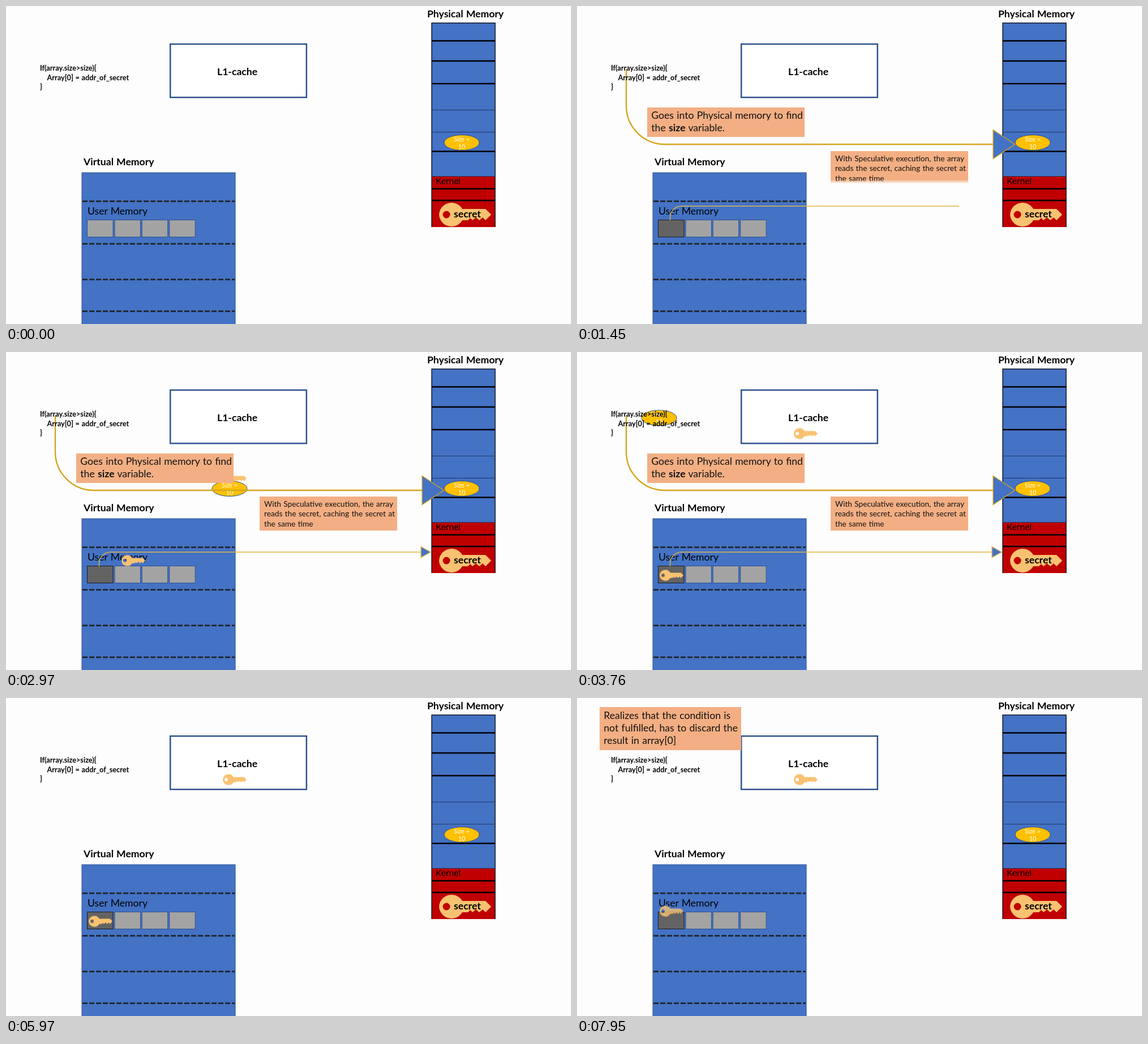
Animation of 998x561 px, one loop 7.99 s. Source, as an HTML page:

```html
<!DOCTYPE html>
<html lang="en">
<head>
<meta charset="utf-8">
<title>Speculative read</title>
<style>
@property --shown { syntax: "<percentage>"; inherits: false; initial-value: 0%; }
:root {
  --loop: 7990ms linear infinite;
  --quad-in: cubic-bezier(.333, 0, .667, .333);
  --quad-out: cubic-bezier(.333, .667, .667, 1);
}
html, body { margin: 0; width: 100%; height: 100%; overflow: hidden; background: #fdfdfd; }
body, text { font-family: Lato, "Open Sans", sans-serif; font-size: 17.6px; word-spacing: .045em; }
svg { position: absolute; left: 0; top: 0; }
.bold { font-weight: 700; }
.code { font-size: 12.7px; font-weight: 700; white-space: pre; }
.size text { font-size: 10.7px; fill: #fff; text-anchor: middle; }
.size ellipse { fill: #ffc000; stroke: #2f528f; }
.cells rect { fill: #a3a3a3; stroke: #2f528f; }
.arrow { fill: none; stroke: #d3a51d; stroke-width: 2.4; }
.arrow polygon { fill: #4472c4; stroke-width: 1.4; }
.arrow.thin { stroke: #dfb545; stroke-width: 1.4; }

/* Captions slide vertically while a soft edge wipes them */
.note {
  position: absolute; box-sizing: border-box; padding: 3.6px 0 0 7.3px;
  background: #f3af83; color: #111; line-height: 22.3px; white-space: nowrap;
  -webkit-mask-image: linear-gradient(#000 calc(var(--shown) - 12%), transparent var(--shown));
  mask-image: linear-gradient(#000 calc(var(--shown) - 12%), transparent var(--shown));
}
#find { left: 124px; top: 178.5px; width: 278px; height: 52.5px; animation: findWipe var(--loop), findSlide var(--loop); }
#spec { left: 448px; top: 255px; width: 242.5px; height: 60px; font-size: 13.7px; line-height: 17.5px; padding-left: 8px;
  animation: specWipe var(--loop), specSlide var(--loop); }
#drop { left: 40px; top: 16px; width: 249.5px; height: 75.5px; animation: dropWipe var(--loop), dropSlide var(--loop); }

@keyframes findWipe { 0%, .25% { --shown: 0%; } 6.51%, 57.07% { --shown: 112%; } 63.45%, 100% { --shown: 0%; } }
@keyframes specWipe { 0%, 12.77% { --shown: 0%; } 19.02%, 57.07% { --shown: 112%; } 63.45%, 100% { --shown: 0%; } }
@keyframes dropWipe { 0%, 86.6% { --shown: 0%; } 92.87%, 100% { --shown: 112%; } }
@keyframes findSlide {
  0%, .25% { translate: 0 56px; animation-timing-function: var(--quad-out); }
  6.51% { translate: 0 0; }
  57.07% { translate: 0 0; animation-timing-function: var(--quad-out); }
  63.45%, 100% { translate: 0 56px; }
}
@keyframes specSlide {
  0%, 12.77% { translate: 0 56px; animation-timing-function: var(--quad-out); }
  19.02% { translate: 0 0; }
  57.07% { translate: 0 0; animation-timing-function: var(--quad-out); }
  63.45%, 100% { translate: 0 56px; }
}
@keyframes dropSlide {
  0%, 86.6% { translate: 0 56px; animation-timing-function: var(--quad-out); }
  92.87%, 100% { translate: 0 0; }
}

/* Arrows wipe in from the left and fade out together */
#toSize { animation: sizeWipe var(--loop), arrowFade var(--loop); }
#toSecret { animation: secretWipe var(--loop), arrowFade var(--loop); }
@keyframes sizeWipe { 0%, .25% { clip-path: inset(-5px 101% -5px -5px); } 6.51%, 100% { clip-path: inset(-5px -5px -5px -5px); } }
@keyframes secretWipe { 0%, 12.77% { clip-path: inset(-5px 101% -5px -5px); } 19.02%, 100% { clip-path: inset(-5px -5px -5px -5px); } }
@keyframes arrowFade { 0%, 57.07% { opacity: 1; } 63.45%, 100% { opacity: 0; } }

#target { animation: darken var(--loop); }
@keyframes darken { 0%, 6.51% { fill: #a3a3a3; stroke: #2f528f; } 12.77%, 100% { fill: #636363; stroke: #1c1c1c; } }

/* Travelling parts */
.mover { offset-rotate: 0deg; }
#sizeCopy { offset-path: path("M805 241H145V86"); animation: sizeTravel var(--loop), sizeSeen var(--loop); }
#keyToCell { offset-path: path("M811 368H167V394"); }
#keyToCache { offset-path: path("M811 368H404V144"); }
#keyToCell, #keyToCache { animation: keyTravel var(--loop), keySeen var(--loop); }
#discard { animation: rise var(--loop); }
@keyframes keyTravel {
  0%, 19.02% { offset-distance: 0%; animation-timing-function: var(--quad-in); }
  31.54% { offset-distance: 50%; animation-timing-function: var(--quad-out); }
  44.06%, 100% { offset-distance: 100%; }
}
@keyframes keySeen { 0%, 19.02% { opacity: 0; } 19.03%, 100% { opacity: 1; } }
@keyframes sizeTravel {
  0%, 21.9% { offset-distance: 0%; animation-timing-function: var(--quad-in); }
  36.98% { offset-distance: 50%; animation-timing-function: var(--quad-out); }
  52.07%, 100% { offset-distance: 100%; }
}
@keyframes sizeSeen { 0%, 21.9% { opacity: 0; } 21.91%, 74.28% { opacity: 1; } 74.29%, 100% { opacity: 0; } }
@keyframes rise {
  0%, 92.87% { translate: 0 0; opacity: 1; animation-timing-function: var(--quad-in); }
  100% { translate: 0 -18px; opacity: .8; }
}
</style>
</head>
<body>
<svg width="998" height="561" viewBox="0 0 998 561">
  <defs>
    <path id="key" fill="#f9c271" fill-rule="evenodd" d="M-46 0A22 22 0 0 1 -5 -10H36L46 0L36 10L31 5L25 10L19 5L13 10L9 6L5 10H-5A22 22 0 0 1 -46 0ZM-39.5 0A6.5 6.5 0 0 0 -26.5 0A6.5 6.5 0 0 0 -39.5 0Z"/>
    <g id="size" class="size">
      <ellipse rx="31" ry="13.5"/>
      <text y="-2.5">Size =</text>
      <text y="11">10</text>
    </g>
  </defs>

  <rect x="290.2" y="67.2" width="240.6" height="94" fill="#fff" stroke="#2f528f" stroke-width="2.5"/>
  <text class="bold" x="373" y="122">L1-cache</text>

  <text class="bold" x="744" y="19.5">Physical Memory</text>
  <rect x="752" y="30" width="112" height="271" fill="#4472c4"/>
  <rect x="752" y="300" width="112" height="90" fill="#c00000"/>
  <path d="M752 390V30H864V390" fill="none" stroke="#0d1526" stroke-width="1.5"/>
  <path d="M752 61.5H864M752 97H864M752 137H864M752 256.5H864M752 322.5H864M752 343H864" stroke="#000" stroke-width="2.6"/>
  <path d="M752 183.5H864M752 222.5H864M752 300.5H864" stroke="#1f3864"/>
  <use href="#size" x="805" y="241"/>
  <text x="759" y="314" style="font-size:15.5px">Kernel</text>
  <use href="#key" x="811" y="368"/>
  <text class="bold" x="791" y="373">secret</text>

  <text class="bold" x="137" y="280.5">Virtual Memory</text>
  <rect x="134" y="294" width="271" height="280" fill="#4472c4" stroke="#2f528f"/>
  <path d="M135 344.5H404M135 419.5H404M135 482.5H404M135 538.5H404" stroke="#222a35" stroke-width="3" stroke-dasharray="9 3"/>
  <text x="144" y="368">User Memory</text>
  <g class="cells">
    <rect id="target" x="143.5" y="377.5" width="45.5" height="30"/>
    <rect x="192" y="377.5" width="45.5" height="30"/>
    <rect x="240.2" y="377.5" width="45.5" height="30"/>
    <rect x="288.7" y="377.5" width="45.5" height="30"/>
  </g>

  <g class="mover" id="sizeCopy"><use href="#size"/></g>

  <g class="arrow" id="toSize">
    <path d="M87 112V176A68 68 0 0 0 155 244H735"/>
    <polygon points="735,218.5 773.5,244 735,269.5"/>
  </g>
  <g class="arrow thin" id="toSecret">
    <path d="M164.500 378V373A20 20 0 0 1 184.500 353H733"/>
    <polygon points="733,343.500 750,353 733,362.500"/>
  </g>

  <text class="code" x="60" y="114">If(array.size&gt;size){</text>
  <text class="code" x="72.500" y="130.500">Array[0] = addr_of_secret</text>
  <text class="code" x="60" y="146.500">}</text>

  <g id="discard"><g class="mover" id="keyToCell"><use href="#key" transform="scale(.456)"/></g></g>
  <g class="mover" id="keyToCache"><use href="#key" transform="scale(.456)"/></g>
</svg>

<div class="note" id="find">Goes into Physical memory to find<br>the <b>size</b> variable.</div>
<div class="note" id="spec">With Speculative execution, the array<br>reads the secret, caching the secret at<br>the same time</div>
<div class="note" id="drop">Realizes that the condition is<br>not fulfilled, has to discard the<br>result in array[0]</div>
</body>
</html>
```
